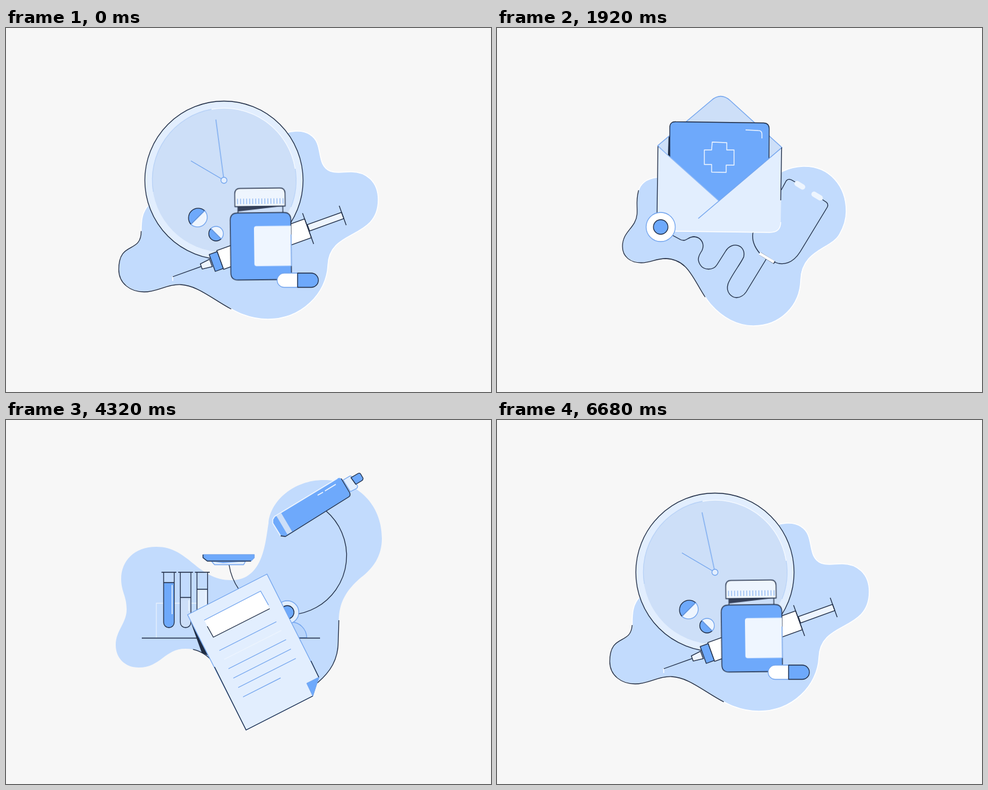
Recreate the animation shown at these times as an HTML page. Size 800 by 600 pixels, loop 6720 ms.

```html
<!DOCTYPE html>
<html lang="en">
<head>
<meta charset="utf-8">
<title>Health scenes</title>
<style>
html, body { margin: 0; width: 100%; height: 100%; overflow: hidden; background: #f7f7f7; }
svg { display: block; width: 100vw; height: 100vh; }
</style>
</head>
<body>
<svg id="stage" viewBox="0 0 800 600"></svg>
<script>
const LOOP = 6720;
const INK = '#1f2c44', BLUE = '#6ea9fb', LINE = '#73a5ee', SKY = '#c2dbfd',
      FACE = '#cddff8', PALE = '#e2eefe', ICE = '#eef5fe', WHITE = '#fff';
const GLIDE = 'cubic-bezier(.35,0,.65,1)', SOFT = 'ease-in-out';

// Markup helpers
const path = (d, fill = 'none', stroke = 'none', w = 1.3) =>
  `<path d="${d}" fill="${fill}" stroke="${stroke}" stroke-width="${w}" stroke-linejoin="round"/>`;
const line = (d, stroke = INK, w = 1.3) => path(d, 'none', stroke, w);
const circle = (x, y, r, fill = 'none', stroke = 'none', w = 1.3) =>
  `<circle cx="${x}" cy="${y}" r="${r}" fill="${fill}" stroke="${stroke}" stroke-width="${w}"/>`;
const group = (id, body) => `<g id="${id}">${body}</g>`;
const series = (n, f) => Array.from({ length: n }, (_, i) => f(i)).join('');
const blob = (id, d, edge = 'none') => path(d, SKY, edge, 1.5) +
  `<path id="${id}" d="${d}" fill="none" stroke="${INK}" stroke-width="1.3"/>`;

function medicine() {
  const shape = 'M478 170C430 172 400 230 340 250C300 262 250 265 236 291C224 303 223 318 223 335' +
    'C223 373 186 350 186 398C186 421 205 435 228 435C250 435 265 422 288 423C320 424 350 456 390 472' +
    'C403 477 418 480 432 480C487 480 529 438 531 391C533 330 614 350 614 283C614 253 594 237 569 237' +
    'C555 237 546 240 535 236C510 226 525 190 502 176C495 171 487 169.5 478 170Z';
  const clock = circle(359.5, 251, 130.5, PALE, INK) + circle(359.5, 251, 118.5, FACE) +
    line('M243 270A118.5 118.5 0 0 1 339 134', '#b9d3f7') +
    line('M339 134A118.5 118.5 0 0 1 477 232', '#f4f9ff') +
    line('M477 232A118.5 118.5 0 0 1 470 295', '#b9d3f7') +
    line('M359.5 251L305 219', LINE) +
    group('minute', line('M359.5 251V150', LINE)) + circle(359.5, 251, 5, PALE, LINE);
  const pills = path('M305.2 323.8A16 16 0 0 1 327.8 301.2Z', BLUE, INK) +
    path('M305.2 323.8A16 16 0 0 0 327.8 301.2Z', ICE, LINE) +
    path('M338 330.5A12 12 0 0 0 355 347.5Z', BLUE, INK) +
    path('M338 330.5A12 12 0 0 1 355 347.5Z', ICE, LINE);
  const syringe = group('syringe', line('M275 409V417', WHITE, 1.5) +
    `<g transform="translate(275 410) rotate(-19.8)">` + line('M0 0H50') +
    path('M50 -4.5L67 -6.5V6.5L50 4.5Z', ICE, INK) + path('M83 -16H237V17H83Z', WHITE, INK) +
    path('M69 -14H83V15.5H69Z', BLUE, INK) + path('M238 -5.5H298V5.5H238Z', ICE, INK) +
    line('M237 -26V28M298 -17V17') + '</g>');
  const bottle = group('bottle', '<g transform="rotate(-.7 421 413)">' +
    path('M384 292H458V306H384Z', FACE, INK) + path('M384 294H458L384 302Z', '#36415a') +
    path('M379 294V273Q379 264 388 264H453Q462 264 462 273V294Z', ICE, INK) +
    line(series(16, i => `M${383.5 + i * 5} 281V290`), LINE, 1) +
    path('M383 304.5H459Q471 304.5 471 316.5V403Q471 415 459 415H383Q371 415 371 403V316.5Q371 304.5 383 304.5Z', BLUE, INK) +
    path('M471 326.5H414Q410 326.5 410 330.5V388.5Q410 392.5 414 392.5H471Z', '#eff6ff') +
    line('M471 341V393', '#8dbafa', 1.6) + '</g>');
  const capsule = path('M481 404H459A11.75 11.75 0 0 0 459 427.5H481Z', WHITE, LINE) +
    path('M481 404H503.5A11.75 11.75 0 0 1 503.5 427.5H481Z', BLUE, INK);
  return blob('edge1', shape, WHITE) + clock + pills + syringe + bottle + capsule;
}

function letter() {
  const shape = 'M505 228C440 230 430 300 350 260C320 246 290 244 265 246C248 248 236 256 233 270' +
    'C229 286 232 295 231 307C229 330 207 335 207 360C207 377 220 387 238 387C253 387 262 380 278 380' +
    'C320 381 325 423 352 455C372 478 397 491 423 491C467 491 500 458 501 415C503 365 551 365 565 340' +
    'C572 328 576 315 576 302C576 260 548 227 505 228Z';
  const cord = line('M290 342L303 349C313 353 314 344 325 344C338 345 343 357 338 367C332 376 330 382 335 390' +
    'C341 400 357 400 363 390L377 368C388 350 411 358 407 377C405 384 385 410 381 422' +
    'C377 436 387 444 395 444.5C402 444 407 441 411 435L444 381') +
    line('M434 372C427 364 420 352 422 338L470 265L477 252Q480 248 485 250L492 254' +
      'M537 283L543 287Q547 290 545 295L500 369C488 388 472 392 458 386') +
    line('M434 372L458 387', INK, 5) + line('M433 371.5L457 386', WHITE, 4.5) +
    `<path d="M495 256.5L504 262M523 274L533 280" stroke="${ICE}" stroke-width="9" stroke-linecap="round"/>`;
  const card = group('card', group('back', path('M283 180L285 178V214L282 210Z', INK)) +
    path('M285 215V164Q285 154 295 154.5L440 156.5Q449 157 449 166L448 300H285Z', BLUE, INK) +
    line('M355 188L379 189V201H391V226H378V238L354 237.5V225H342V201L354 201Z', ICE, 1.4) +
    line('M410 168L431 169Q437 169 437 175V182', ICE, 1.4));
  const envelope = group('envelope',
    path('M265 194L354 119Q369 106 384 119L470 197L366 290Z', FACE, LINE) + card +
    path('M265.5 195L264 335L450 337Q468 337 468 320L470 197L366 285Z', PALE) +
    line('M265.5 195L366 285', '#8fb9f6') + line('M470 197L332 314', LINE) +
    line('M265.5 195L264 306M469.5 197L468 284') +
    line('M294 335L450 337Q468 337 468 320', WHITE) +
    group('shade', path('M280 306V311.5L290 312Z', BLUE) + line('M280 306V311.5L300 312')));
  return blob('edge2', shape, WHITE) + cord + envelope +
    circle(270, 328, 24, WHITE, LINE) + circle(270, 328, 12, BLUE, INK);
}

function heart() {
  const shape = 'M483 260L309 240C311 262 310 288 300 302C290 318 262 325 240 340C225 349 217 361 217 375' +
    'C217 398 234 414 256 414C280 413 300 404 325 405C350 408 355 420 370 437C392 464 420 480 445 480' +
    'C478 480 500 461 510 430C517 408 520 392 545 379C575 364 611 356 611 320C611 295 592 279 570 279' +
    'C550 279 535 289 512 285C497 282 487 272 483 260Z';
  const little = 'M438 366C440 345 441 325 448 315Q453 308 457 309C458 330 452 350 454 371C456 390 452 402 440 406';
  const arm = 'M265 448L318 374C328 361 337 352 352 349C370 345 385 340 398 334';
  const hand = path(arm + 'L390 360L438 366' +
      'L480 370L470 396L437 407C410 412 380 415 357 424C345 432 342 450 336 470Z', WHITE) +
    path('M447 402L482 368C500 358 525 349 543 347Q552 346 557 350C530 364 485 385 462 397Q450 404 438 407Z', WHITE, INK) +
    path('M449 402L466 370C480 350 500 333 515 321Q530 311 543 313C530 331 505 350 486 365Z', WHITE, INK) +
    path('M445 398L454 368C465 345 478 322 487 309Q496 299 507 301.5C502 320 482 345 467 369Z', WHITE, INK) +
    path('M454 371L460 376L478 353L464 386L450 401Z', WHITE) +
    path('M456 388L466 371L478 353Q469 375 456 388ZM463 388L479 371L494 359Q478 377 463 388Z', INK) +
    path(little + 'L420 402L415 380Z', WHITE) + line(little) +
    line('M417 387L432 384Q437 382 437 370') + path('M433 384Q441 380 438 367Q437 379 433 384Z', INK) +
    path('M385 340L406 338L436 310C436 325 430 340 418 350C410 357 400 359 390 360L365 360Z', WHITE) +
    line('M436 310C436 325 430 340 418 350C410 357 400 359 390 360C375 360 365 362 355 364.5') +
    line('M390 360C407 359 423 364 438 366') + path('M390 360Q401 356 410 361Z', INK) +
    line(arm + 'L406 338') +
    line('M440 406C410 411 380 415 357 424C345 432 342 450 336 470');
  const row = (x, y, n) => series(n, i => circle(x + i * 14.3, y + i * 14.4, 4.4, PALE));
  const dots = series(3, k => row(405 - 27 * k, 171 + 27 * k, 6) + row(399 - 27 * k, 191.5 + 27 * k, 5));
  const body = path('M407 143A68.5 68.5 0 1 1 504 241Z', BLUE, INK) +
    path('M309 240A68.5 68.5 0 1 1 407 143Z', PALE, INK) +
    path('M407 143L504 241L406 338L309 240Z', BLUE) + line('M297 223Q301 232 309 240L406 338L432 312', LINE) +
    line('M363 187L407 143L504 241M486 260L432 312') + line('M309 240L363 187', LINE) +
    line('M497 152Q513 168 513 192', ICE, 1.4);
  return blob('edge3', shape) + hand + body + dots +
    line('M266 229H360C380 229 388 213 394 183L417 297C423 263 436 248 462 248H570', '#2b4166');
}

function lab() {
  const shape = 'M524 99C475 99 436 133 433 170C428 200 425 264 372 264C315 264 302 209 248 209' +
    'C212 209 190 232 190 262C190 283 199 290 199 312C199 335 181 347 181 371C181 392 196 408 219 408' +
    'C255 408 262 377 296 377C330 377 340 400 370 425C410 450 470 462 514 433C535 415 548 395 548 365' +
    'L549 331C549 300 562 280 585 260C605 245 620 225 620 195C620 140 580 99 524 99Z';
  const tube = (x, level, fill) =>
    path(`M${x} ${level}V333.5A8.75 8.75 0 0 0 ${x + 17.5} 333.5V${level}Z`, fill) +
    line(`M${x} 251V333.5A8.75 8.75 0 0 0 ${x + 17.5} 333.5V251M${x - 3.5} 251H${x + 21}M${x} ${level}H${x + 17.5}`);
  const tubes = line('M248 359V302H330', '#e6f0fd') + tube(260, 268, BLUE) + tube(287.5, 292.5, FACE) +
    tube(315, 279, PALE) + line('M274 272V320M301.5 297V315M329 283V310', ICE, 1.5);
  const scope = path('M444 359A26 26 0 0 1 496 359Z', '#b9d5fb', LINE) + line('M224 359.5H518') +
    line('M528 150A97.5 97.5 0 1 1 368 239') +
    path('M339 233H395L392 238.5H344Z', PALE, LINE) +
    path('M325 222H409.5V227L404 232.5H332L325 227Z', BLUE, LINE) +
    line('M325 222V227L332 232.5H404') + path('M345 234H384L358 236Z', LINE) +
    circle(464, 317, 19, PALE, LINE) + circle(464, 317, 11, BLUE, INK);
  const barrel = group('barrel',
    path('M556 99L567 92.5Q570 92 571 94L580 109Q580 112 578 113L568 118Z', PALE, LINE) +
    path('M569 95L581 88Q584 87 585 89L589 96Q589 99 587 100L577 106Z', BLUE, INK) +
    path('M440 170V164L443 159L547 96Q552 94 555 99L567 120Q569 125 565 127L461 192L453 191Z', BLUE) +
    path('M446 158L454 153.5L472 184L464 188.5Z', FACE) +
    line('M453 191L440 170V164L443 159L547 96', ICE, 1.5) +
    line('M553 96.5L567 120Q569 125 565 127L461 192L453 191') +
    line('M514 124L523 119M526 117L544 106', ICE, 1.5));
  const rule = (x, y, w, c = LINE) => line(`M${x} ${y}l${w} ${-w * 0.505}`, c);
  const paper = group('paper', path('M304 331L333 388L323 384Z', INK) +
    path('M299.5 321L430.5 254L516 424L506 455L396 511Z', PALE, LINE) +
    path('M516 424L506 455L496 434Z', BLUE, LINE, 1) +
    line('M344 407L396 511L506 455M503 397L516 424') +
    path('M327 330L420 282L435 311L342 358Z', WHITE) +
    line('M327 330L420 282L433 305', LINE) + line('M332 340L342 358L435 311') +
    rule(352, 380, 94) + rule(360, 394.5, 94, ICE) + rule(367, 410, 95) +
    rule(375, 425.5, 95) + rule(383, 441, 95) + rule(391, 456.5, 62));
  return blob('edge4', shape) + tubes + scope + barrel + paper;
}

const stage = document.getElementById('stage');
stage.innerHTML = [medicine, letter, heart, lab].map((draw, i) => group('scene' + (i + 1), draw())).join('');
const get = id => document.getElementById(id);

// keys: [ms, value, easing to the next key]
function play(id, prop, keys) {
  const first = keys[0], last = keys[keys.length - 1];
  const all = [[0, first[1]], ...keys, [LOOP, last[1]]];
  get(id).animate(all.map(([t, v, easing = 'linear']) => ({ offset: t / LOOP, [prop]: v, easing })),
    { duration: LOOP, iterations: Infinity });
}
const slide = (id, keys) =>
  play(id, 'transform', keys.map(([t, x, e = SOFT]) => [t, `translate(${x}px,0px)`, e]));
function turn(id, origin, keys) {
  get(id).style.transformOrigin = origin;
  play(id, 'transform', keys.map(([t, a, e = SOFT]) => [t, `rotate(${a}deg)`, e]));
}

// Length along a path nearest to a point
function lengthAt(el, [x, y]) {
  let best = 0, near = Infinity;
  for (let s = 0, end = el.getTotalLength(); s < end; s++) {
    const p = el.getPointAtLength(s), d = Math.hypot(p.x - x, p.y - y);
    if (d < near) { near = d; best = s; }
  }
  return best;
}
// Dark part of an outline; keys: [ms, shift along the path, visible share]
function trace(id, from, to, keys) {
  const el = get(id), a = lengthAt(el, from), b = lengthAt(el, to);
  play(id, 'strokeDasharray', keys.map(([t, shift, share = 1]) => {
    const len = (b - a) * share;
    return [t, `0px ${b - len + shift}px ${len}px 3000px`];
  }));
}

slide('scene1', [[0, 0], [140, 10, GLIDE], [980, -790], [980, 900], [5380, 900], [5380, 800, GLIDE], [5980, -5], [6300, 0]]);
slide('scene2', [[140, 816, GLIDE], [980, -6], [1300, 0], [1920, 0], [2060, 25, GLIDE], [2700, -816]]);
slide('scene3', [[2060, 825, GLIDE], [2700, -16], [3100, 0], [3440, 0], [3520, 12, GLIDE], [4090, -810]]);
slide('scene4', [[3520, 812, GLIDE], [4090, -10], [4300, 0], [4780, 0], [4950, 15, GLIDE], [5730, -807]]);

turn('minute', '359.5px 251px', [[0, -7.7, 'linear'], [280, 22, 'linear'], [560, 45], [1000, 70],
  [5380, -161.8, 'linear'], [LOOP, -7.7]]);
turn('bottle', '421px 413px', [[0, 0], [560, 5.4], [1000, 0], [5380, -5], [6000, -2], [6500, 0]]);
turn('syringe', '443px 345px', [[0, 0], [560, 6.5], [1000, 0], [5380, -6], [6000, -2], [6500, 0]]);

turn('envelope', '350px 337px', [[560, 1.7], [1300, 0]]);
play('card', 'transform', [[560, 'translate(0px,13px)', SOFT], [1600, 'translate(0px,0px)']]);
play('back', 'opacity', [[900, 0], [1500, 1]]);
play('shade', 'opacity', [[640, 1], [1000, 0]]);
slide('edge2', [[1400, -211], [1880, 0]]);

turn('barrel', '504px 144px', [[4320, 0], [5400, 2.2]]);
turn('paper', '299px 321px', [[3600, 4], [4320, 0], [4780, -1], [5400, -5.2]]);

trace('edge1', [223, 335], [371, 463], [[0, 0], [1000, -60], [1000, 84], [5600, 84], [LOOP, 0]]);
trace('edge2', [234, 267], [343, 443], [[1360, -8, 0.006], [1920, 0], [2700, -50]]);
trace('edge3', [282, 317], [370, 437], [[2300, 70, 0.5], [3440, 0], [4090, -50]]);
trace('edge4', [308, 378], [549, 331], [[3520, 70, 0.7], [4320, 0], [5400, -120], [5730, -150]]);
</script>
</body>
</html>
```
